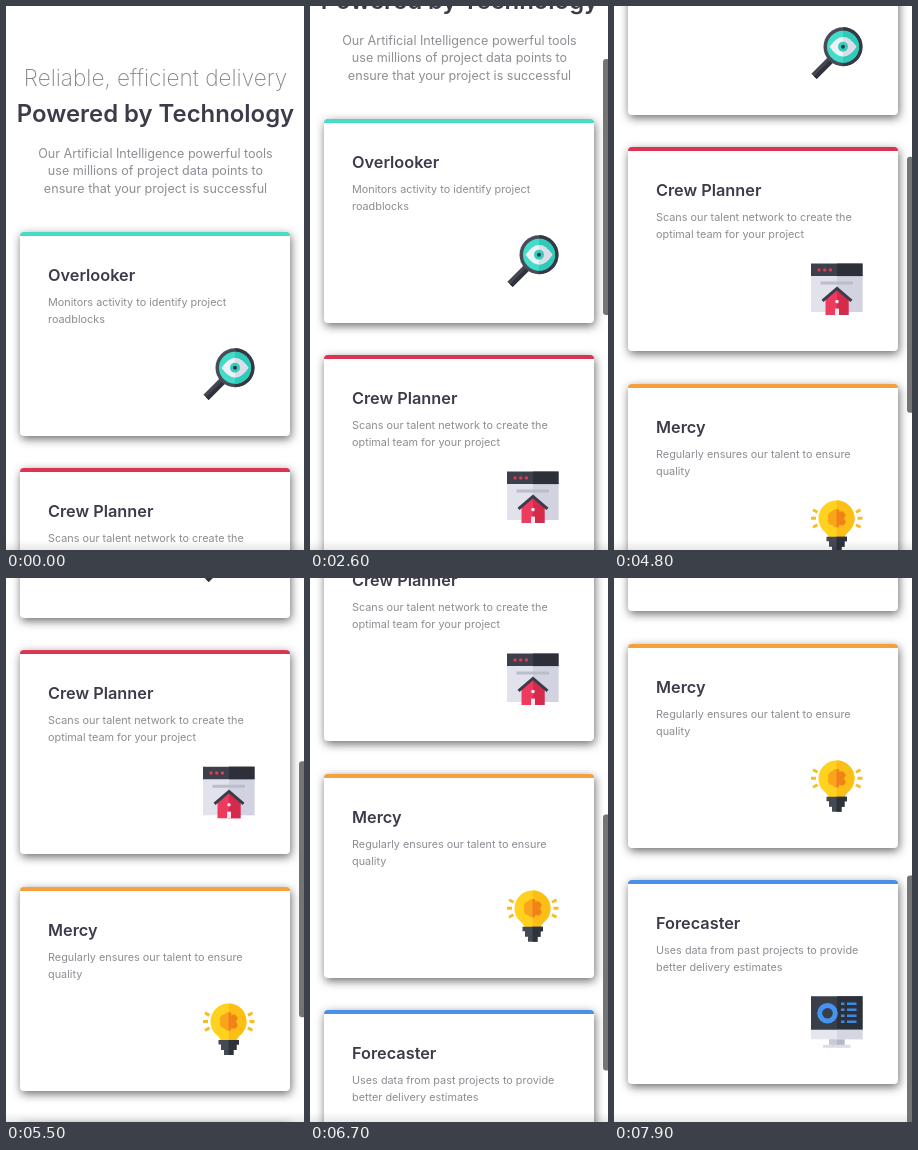
Recreate the animation shown at these times as an HTML page. Size 298 px wide and 544 px high, loop 8000 ms.

```html
<!DOCTYPE html>
<html lang="en">
<head>
<meta charset="utf-8">
<title>Powered by Technology</title>
<style>
@property --scroll { syntax: "<number>"; inherits: true; initial-value: 0; }

html, body { margin: 0; width: 100%; height: 100%; overflow: hidden; background: #fff; }
.stage {
  position: relative; width: 298px; height: 544px; overflow: hidden; background: #fff;
  font-family: Inter, "Open Sans", sans-serif;
  animation: scroll 8s infinite;
}
.page { position: absolute; inset: 0; transform: translateY(calc(var(--scroll) * -1px)); }
.page svg { position: absolute; display: block; overflow: visible; }

.intro { left: 0; top: 0; text-anchor: middle; }
.thin { font-size: 22.6px; font-weight: 200; fill: #85848c; }
.bold { font-size: 23.9px; font-weight: 600; fill: #3d3a4a; }
.lead { font-size: 12.6px; fill: #8e8e94; }

.card {
  position: absolute; left: 14px; top: calc(226px + var(--i) * 236.3px);
  box-sizing: border-box; width: 270px; height: 204px;
  border-top: 4px solid var(--tint); border-radius: 4px;
  background: #fff; box-shadow: 1px 3px 10px rgba(0, 0, 0, .58);
}
.card svg { left: 0; top: -4px; }
.title { font-size: 16.3px; font-weight: 600; fill: #3d3a4a; }
.body { font-size: 10.85px; fill: #8d8c93; }

.bar {
  position: absolute; left: 292.5px; top: 0; width: 7px; height: 256px;
  border-radius: 3px; background: #747474;
  opacity: var(--scroll);
  transform: translateY(calc(var(--scroll) * .47px));
}
.edge {
  position: absolute; left: 0; right: 0; bottom: 0; height: 10px;
  background: linear-gradient(rgba(0, 0, 0, 0), rgba(0, 0, 0, .09));
}

/* Scrolling advances once every 100 ms */
@keyframes scroll {
  0%     { --scroll: 0;   animation-timing-function: step-end; }
  16.25% { --scroll: 0;   animation-timing-function: steps(13); }
  32.5%  { --scroll: 113; animation-timing-function: steps(11); }
  46.25% { --scroll: 221; animation-timing-function: steps(11); }
  60%    { --scroll: 321; animation-timing-function: steps(13); }
  76.25% { --scroll: 449; animation-timing-function: steps(11); }
  90%    { --scroll: 548; animation-timing-function: steps(7); }
  98.75%, 100% { --scroll: 633; animation-timing-function: step-end; }
}
</style>
</head>
<body>
<div class="stage">
  <div class="page">
    <svg class="intro" width="298" height="200">
      <text class="thin" x="149.5" y="80">Reliable, efficient delivery</text>
      <text class="bold" x="149.5" y="116.3">Powered by Technology</text>
      <g class="lead">
        <text x="149.5" y="151.5">Our Artificial Intelligence powerful tools</text>
        <text x="149.5" y="169.2">use millions of project data points to</text>
        <text x="149.5" y="186.9">ensure that your project is successful</text>
      </g>
    </svg>

    <div class="card" style="--i:0; --tint:#46dcc8">
      <svg width="270" height="204">
        <text class="title" x="28" y="49">Overlooker</text>
        <text class="body" x="28" y="73.5">Monitors activity to identify project</text>
        <text class="body" x="28" y="91.2">roadblocks</text>
        <g transform="translate(183 116.3)">
          <path d="M21 31 3 49" stroke="#434751" stroke-width="7.5"/>
          <path d="M22.3 32.3 4.3 50.3" stroke="#2f323b" stroke-width="3.8"/>
          <circle cx="32" cy="19.5" r="19.5" fill="#484c57"/>
          <path d="M32 0a19.5 19.5 0 0 1 0 39z" fill="#353943"/>
          <circle cx="32" cy="19.5" r="16" fill="#43dcca"/>
          <path d="M32 3.5a16 16 0 0 1 0 32z" fill="#2fcbba"/>
          <path d="M18.5 19.5Q32 0 45.5 19.5Q32 39 18.5 19.5z" fill="#f0f0f7"/>
          <path d="M32 9.7Q39 10 45.5 19.5Q39 29 32 29.3z" fill="#dcdde8"/>
          <circle cx="32" cy="19.5" r="5" fill="#35cdbb"/>
          <circle cx="32" cy="19.5" r="2" fill="#353943"/>
        </g>
      </svg>
    </div>

    <div class="card" style="--i:1; --tint:#dc3350">
      <svg width="270" height="204">
        <text class="title" x="28" y="49">Crew Planner</text>
        <text class="body" x="28" y="73.5">Scans our talent network to create the</text>
        <text class="body" x="28" y="91.2">optimal team for your project</text>
        <g transform="translate(183 116.6)">
          <path d="M0 12H51.5V48.5H0z" fill="#e2e2ec"/>
          <path d="M26 12H51.5V48.5H26z" fill="#d2d3e0"/>
          <path d="M0 0H51.5V12.5H0z" fill="#3c404b"/>
          <path d="M26 0H51.5V12.5H26z" fill="#2c3039"/>
          <g fill="#e8365a">
            <circle cx="8" cy="6.3" r="1.7"/>
            <circle cx="13.7" cy="6.3" r="1.7"/>
            <circle cx="19.4" cy="6.3" r="1.7"/>
          </g>
          <path d="M9.5 19.5H42" stroke="#bcbdca" stroke-width="3"/>
          <path d="M14.5 36 26 26 37.5 36V51.5H14.5z" fill="#ee3a5e"/>
          <path d="M26 26 37.5 36V51.5H26z" fill="#d42a4c"/>
          <path d="M11.5 37.2 26 24.8 40.5 37.2" fill="none" stroke="#3a3d48" stroke-width="3"/>
          <circle cx="26" cy="38" r="1.8" fill="#f1e6ee"/>
          <path d="M24 45H28V51.5H24z" fill="#f1e6ee"/>
        </g>
      </svg>
    </div>

    <div class="card" style="--i:2; --tint:#f5a03c">
      <svg width="270" height="204">
        <text class="title" x="28" y="49">Mercy</text>
        <text class="body" x="28" y="73.5">Regularly ensures our talent to ensure</text>
        <text class="body" x="28" y="91.2">quality</text>
        <g transform="translate(183 116.3)">
          <path d="M18 38Q17 34 12 30A18 18 0 1 1 39 30Q34 34 33 38z" fill="#ffd21f"/>
          <path d="M25.5 0A18 18 0 0 1 39 30Q34 34 33 38H25.5z" fill="#fdbf16"/>
          <g stroke="#f9a51a" stroke-width="5">
            <circle cx="25.5" cy="18" r="6" fill="#f9a51a"/>
            <path d="M25.5 9V27M17.7 13.5 33.3 22.5M17.7 22.5 33.3 13.5"/>
          </g>
          <path d="M25.5 9H28V12L32 11 35 15 32.5 18 35 22 32 25.5 28 24V27H25.5z" fill="#f18218"/>
          <g stroke="#f7bd28" stroke-width="3">
            <path d="M2 9.5 6.5 12M0 18H5M2 27 6.5 24.5M49.5 9.5 45 12M51.5 18H46.5M49.5 27 45 24.5"/>
          </g>
          <path d="M15.5 36.5H36V41H33.5V46.5H30.5V51.5H21V46.5H18V41H15.5z" fill="#454954"/>
          <path d="M25.5 36.5H36V41H33.5V46.5H30.5V51.5H25.5z" fill="#2e323b"/>
        </g>
      </svg>
    </div>

    <div class="card" style="--i:3; --tint:#4a90e8">
      <svg width="270" height="204">
        <text class="title" x="28" y="49">Forecaster</text>
        <text class="body" x="28" y="73.5">Uses data from past projects to provide</text>
        <text class="body" x="28" y="91.2">better delivery estimates</text>
        <g transform="translate(183 116.3)">
          <path d="M18 42H33.5V49H18z" fill="#c9cad7"/>
          <path d="M26 42H33.5V49H26z" fill="#b7b8c7"/>
          <path d="M12 48.5H39.5V51.5H12z" fill="#dcdde7"/>
          <path d="M0 0H51.5V34H0z" fill="#3a3e49"/>
          <path d="M26 0H51.5V34H26z" fill="#2c3039"/>
          <path d="M0 33.5H51.5V43H0z" fill="#e6e6ef"/>
          <path d="M26 33.5H51.5V43H26z" fill="#d5d6e2"/>
          <circle cx="16.5" cy="17" r="7.8" fill="none" stroke="#4595ee" stroke-width="5"/>
          <g stroke="#4088dc" stroke-width="2.6">
            <path d="M30 7.5H33.5M36 7.5H45.5M30 13.5H33.5M36 13.5H45.5M30 19.5H33.5M36 19.5H45.5M30 25.5H33.5M36 25.5H45.5"/>
          </g>
        </g>
      </svg>
    </div>
  </div>
  <div class="edge"></div>
  <div class="bar"></div>
</div>
</body>
</html>
```
